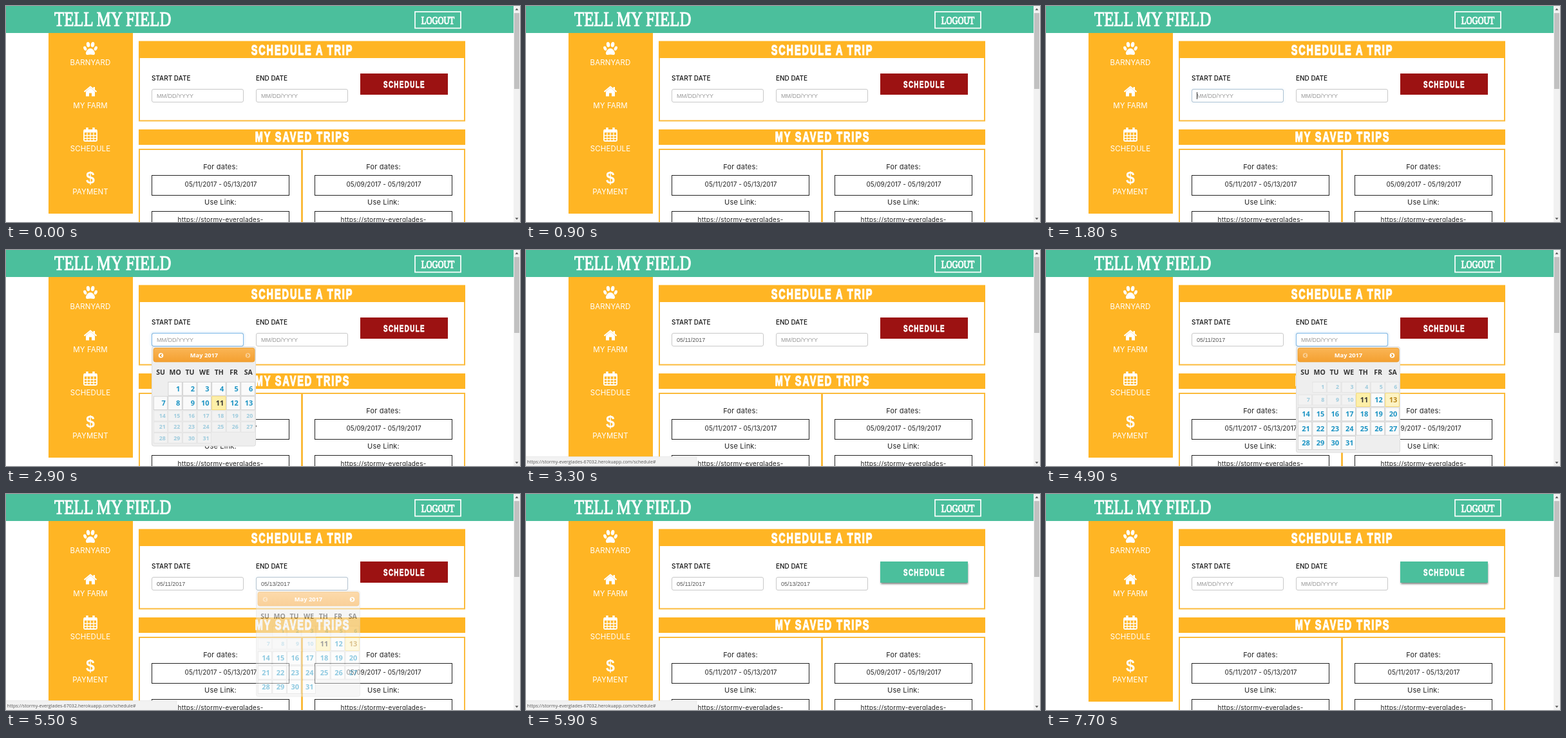
Write an HTML page that moves like this. It is 798 by 336 pixels and loops after 8000 ms.

```html
<!DOCTYPE html>
<html lang="en">
<head>
<meta charset="utf-8">
<title>Trip schedule</title>
<style>
html, body { margin: 0; width: 100%; height: 100%; overflow: hidden; background: #fff; }
svg { display: block; width: 798px; height: 336px; }
text { font-family: Inter, "Open Sans", sans-serif; white-space: pre; }
.mid { text-anchor: middle; }
.end { text-anchor: end; }
.slab { font-family: "Liberation Serif", "Noto Serif", serif; fill: #fff; stroke: #fff; stroke-width: .85; }
.head { font: bold 14.5px "Liberation Sans", sans-serif; letter-spacing: 1.9px; fill: #fff; stroke: #fff; stroke-width: .9; }
.btn { font-size: 9.8px; letter-spacing: 1.4px; stroke-width: .5; }
.nav { font-size: 11.5px; letter-spacing: .1px; fill: #fff; }
.name { font-size: 10px; font-weight: 500; fill: #111; }
.note { font-size: 11px; letter-spacing: .2px; fill: #222; }
.date { font-size: 10px; fill: #222; }
.link { font-size: 10px; letter-spacing: .22px; fill: #222; }
.field { font: 9px "Liberation Sans", sans-serif; }
.cal text { font-family: "Open Sans", "Noto Sans", sans-serif; font-weight: 700; }
.week { font-size: 10.5px; fill: #333; }
.day { font-size: 11px; fill: #1c94c4; }
.off { font-size: 8.8px; fill: #1c94c4; }
.url { font: 7.15px "Open Sans", sans-serif; fill: #555; }
</style>
</head>
<body>
<svg id="stage" viewBox="0 0 798 336" xmlns="http://www.w3.org/2000/svg">
  <defs>
    <linearGradient id="bar" x1="0" y1="0" x2="0" y2="1">
      <stop offset="0" stop-color="#fab556"/><stop offset="1" stop-color="#f4a030"/>
    </linearGradient>
    <filter id="soft" x="-20%" y="-50%" width="140%" height="200%"><feGaussianBlur stdDeviation="1.6"/></filter>
  </defs>
  <g id="page">
    <rect width="788" height="42" fill="#4bbf9c"/>
    <rect x="635" y="9" width="71" height="25.5" fill="none" stroke="#fff" stroke-width="1.7"/>
    <rect x="788" width="10" height="336" fill="#f1f1f1"/>
    <rect x="789" y="11" width="8" height="118" fill="#c1c1c1"/>
    <path d="M790.5 6.5l2.5-3 2.5 3zM790.5 329.5l2.5 3 2.5-3z" fill="#555"/>
    <rect x="66" y="42" width="131" height="281" fill="#ffb524"/>

    <g fill="#fff">
      <ellipse cx="127.6" cy="60" rx="2.7" ry="4" transform="rotate(-10 127.6 60)"/>
      <ellipse cx="134.6" cy="60" rx="2.7" ry="4" transform="rotate(10 134.6 60)"/>
      <ellipse cx="122.8" cy="66" rx="2.3" ry="3.5" transform="rotate(-25 122.8 66)"/>
      <ellipse cx="139.3" cy="66" rx="2.3" ry="3.5" transform="rotate(25 139.3 66)"/>
      <path d="M131 66c4 0 7 5 7 7.5 0 4-4 2-7 2s-7 2-7-2c0-2.500 3-7.500 7-7.500z"/>
      <path d="M131 127l7 6v7.500h-5v-5h-4v5h-5v-7.500z"/>
      <path d="M121.500 133.500l9.500-8 9.500 8" fill="none" stroke="#fff" stroke-width="2"/>
      <path d="M135.500 126h2.500v5l-2.500-2z"/>
    </g>
    <g fill="none" stroke="#fff">
      <rect x="121" y="193" width="20" height="17" rx="1.5" stroke-width="1.8"/>
      <path d="M121 194.500h20" stroke-width="4.500"/>
      <path d="M126 197v13M131 197v13M136 197v13M121 201.500h20M121 206h20" stroke-width="1.300"/>
      <path d="M126 189v5M136 189v5" stroke-width="3.400"/>
    </g>
    <text class="mid" x="131" y="276" style="font:bold 25px 'Liberation Sans',sans-serif" fill="#fff">$</text>

    <g fill="none" stroke="#fbbb3c" stroke-width="2">
      <rect x="207" y="80" width="505" height="98.5"/>
      <path d="M207 340V223H712V340"/>
      <path d="M459.500 223V340" stroke-width="3"/>
    </g>
    <path d="M206 54.500h507V81H206zM206 192h507v24H206z" fill="#ffb524"/>
    <g fill="#fff" stroke="#222">
      <rect x="226.5" y="263.5" width="213" height="31"/>
      <rect x="226.5" y="319.5" width="213" height="40"/>
      <rect x="479.5" y="263.5" width="213" height="31"/>
      <rect x="479.5" y="319.5" width="213" height="40"/>
    </g>
  </g>
  <g id="form">
    <rect id="shade" x="551" y="108" width="135" height="32" fill="#000" opacity="0" filter="url(#soft)"/>
    <rect x="550" y="105" width="136" height="33" fill="#9c1212"/>
    <rect id="hover" x="550" y="105" width="136" height="33" fill="#4bbf9c" opacity="0"/>
  </g>
  <g id="cals"></g>
  <g id="status" opacity="0">
    <rect x="-1" y="321.5" width="266" height="16" fill="#f2f2f2" stroke="#e2e2e2" stroke-width=".6"/>
    <text class="url" x="1.5" y="332">https://stormy-everglades-67032.herokuapp.com/schedule#</text>
  </g>
</svg>
<script>
const LOOP = 8000;
const $ = id => document.getElementById(id);
const page = $('page'), form = $('form');

function add(parent, tag, attrs, text) {
  const el = document.createElementNS('http://www.w3.org/2000/svg', tag);
  for (const k in attrs) el.setAttribute(k, attrs[k]);
  if (text) el.textContent = text;
  parent.appendChild(el);
  return el;
}
const label = (parent, cls, x, y, text) => add(parent, 'text', { class: cls, x, y }, text);
// Tall display lettering, one vertical scale per face
const tall = (parent, cls, x, y, scale, text, size) =>
  add(parent, 'text', {
    class: cls, transform: `translate(${x} ${y}) scale(1 ${scale})`,
    style: size ? `font-size:${size}px` : ''
  }, text);

tall(page, 'slab', 75, 31, 1.25, 'TELL MY FIELD', 24.8);
tall(page, 'slab mid', 670.5, 28, 1.4, 'LOGOUT', 12.5);
tall(page, 'head mid', 460, 76, 1.53, 'SCHEDULE A TRIP');
tall(page, 'head mid', 460.5, 211, 1.53, 'MY SAVED TRIPS');
tall(form, 'head btn mid', 618.5, 126.5, 1.53, 'SCHEDULE');

['BARNYARD', 'MY FARM', 'SCHEDULE', 'PAYMENT'].forEach((s, i) =>
  label(page, 'nav mid', 131, 92 + 67 * i, s));

const trips = [333, 586].map(x => {
  label(page, 'note mid', x, 253.5, 'For dates:');
  label(page, 'note mid', x, 309, 'Use Link:');
  label(page, 'link mid', x, 336, 'https://stormy-everglades-');
  return label(page, 'date mid', x + .5, 280.5, '05/11/2017 - 05/13/2017');
});

function makeField(x, name) {
  label(form, 'name', x, 115.5, name);
  const box = { x: x + .5, y: 129.5, width: 142, height: 20, rx: 2.5 };
  const glow = add(form, 'rect', { ...box, fill: 'none', stroke: '#66afe9', 'stroke-width': 4, filter: 'url(#soft)' });
  add(form, 'rect', { ...box, fill: '#fff', stroke: '#c8c8c8' });
  const ring = add(form, 'rect', { ...box, fill: 'none', stroke: '#7fb9e8' });
  const text = label(form, 'field', x + 8, 142.7, 'MM/DD/YYYY');
  const caret = add(form, 'rect', { x: x + 8, y: 134, width: .9, height: 11, fill: '#222' });
  return { glow, ring, text, caret };
}

function makeCalendar(x, height, first, last, prevOn) {
  const g = add($('cals'), 'g', { class: 'cal', opacity: 0 });
  const cells = {};
  add(g, 'rect', { x: x + .5, y: 150.5, width: 161, height, rx: 3, fill: '#eee', stroke: '#ddd' });
  add(g, 'rect', { x: x + 3, y: 152.5, width: 157, height: 21.5, rx: 3, fill: 'url(#bar)', stroke: '#e9981f', 'stroke-width': .8 });
  label(g, 'mid', x + 81.5, 166.7, 'May 2017').setAttribute('style', 'font-size:9.3px;fill:#fff');
  [[14, prevOn, -1], [149, !prevOn, 1]].forEach(([dx, on, dir]) => {
    const icon = add(g, 'g', { transform: `translate(${x + dx + .5} 164) scale(${dir} 1)`, opacity: on ? 1 : .4 });
    add(icon, 'circle', { r: 3.8, fill: '#fff' });
    add(icon, 'path', { d: 'M-1-2l2 2-2 2', fill: 'none', stroke: '#e78f08', 'stroke-width': 1.3 });
  });
  ['SU', 'MO', 'TU', 'WE', 'TH', 'FR', 'SA'].forEach((s, i) =>
    label(g, 'week mid', x + 14 + 22.7 * i, 193.5, s));

  let top = 204.7;
  for (let row = 0; row < 5; row++) {
    const days = [0, 1, 2, 3, 4, 5, 6].map(c => row * 7 + c);
    const on = d => d >= first && d <= last;
    const h = days.some(on) ? 22.3 : 17.3;
    days.forEach((d, c) => {
      if (d < 1 || d > 31) return;
      const cx = x + 3.3 + 22.6 * c, ch = on(d) ? 20.8 : 16;
      const cell = add(g, 'g', { opacity: on(d) ? 1 : .38 });
      const box = add(cell, 'rect', { x: cx, y: top + (h - ch) / 2, width: 21.4, height: ch, fill: '#fafafa', stroke: '#d0d0d0', 'stroke-width': .9 });
      const num = label(cell, (on(d) ? 'day' : 'off') + ' end', cx + 18.5, top + h / 2 + (on(d) ? 3.8 : 3), d);
      cells[d] = { box, num };
    });
    top += h;
  }
  paint(cells[11], '#fdefa8', '#f3d873', '#363636');
  return { g, cells };
}

function paint(cell, fill, stroke, ink) {
  cell.box.setAttribute('fill', fill);
  cell.box.setAttribute('stroke', stroke);
  cell.num.style.fill = ink;
}

const fields = [makeField(226, 'START DATE'), makeField(388, 'END DATE')];
const cals = [makeCalendar(226, 154.5, 1, 13, true), makeCalendar(388, 164.5, 11, 31, false)];

const steps = [
  { focus: 1740, open: 1800, pick: 3050, value: '05/11/2017', caretOff: 2350 },
  { focus: 4140, open: 4200, pick: 5400, value: '05/13/2017', caretOff: 4650 }
];
const HOVER_13 = 4700, BUTTON = 5700, SAVED = 6500;

const ramp = (t, from, len) => Math.min(1, Math.max(0, (t - from) / len));
const swing = p => .5 - Math.cos(p * Math.PI) / 2;
const pulse = (t, a, b, len) => swing(ramp(t, a, len)) * (1 - swing(ramp(t, b, len)));
const fade = (el, v) => el.setAttribute('opacity', v.toFixed(3));

function draw(t) {
  steps.forEach((s, i) => {
    const f = fields[i];
    const focus = pulse(t, s.focus, s.pick, 150);
    const filled = t >= s.pick && t < SAVED;
    fade(f.glow, focus * .2);
    fade(f.ring, focus);
    fade(f.caret, t >= s.focus && t < s.caretOff ? 1 : 0);
    f.text.textContent = filled ? s.value : 'MM/DD/YYYY';
    f.text.style.fill = filled ? '#555' : '#999';
    fade(cals[i].g, pulse(t, s.open, s.pick, 200));
  });
  if (t >= HOVER_13) paint(cals[1].cells[13], '#fdf3c4', '#f5d568', '#b98518');
  else paint(cals[1].cells[13], '#fafafa', '#d0d0d0', '#1c94c4');

  fade($('status'), Math.max(pulse(t, 3000, 3700, 150), pulse(t, 5200, 6050, 150)));
  const hover = ramp(t, BUTTON, 150);
  fade($('hover'), hover);
  fade($('shade'), hover * .5);
  trips[1].textContent = t < SAVED ? '05/09/2017 - 05/19/2017' : '05/11/2017 - 05/13/2017';
}

const start = performance.now();
function tick() {
  draw((performance.now() - start) % LOOP);
  requestAnimationFrame(tick);
}
draw(0);
requestAnimationFrame(tick);
</script>
</body>
</html>
```
